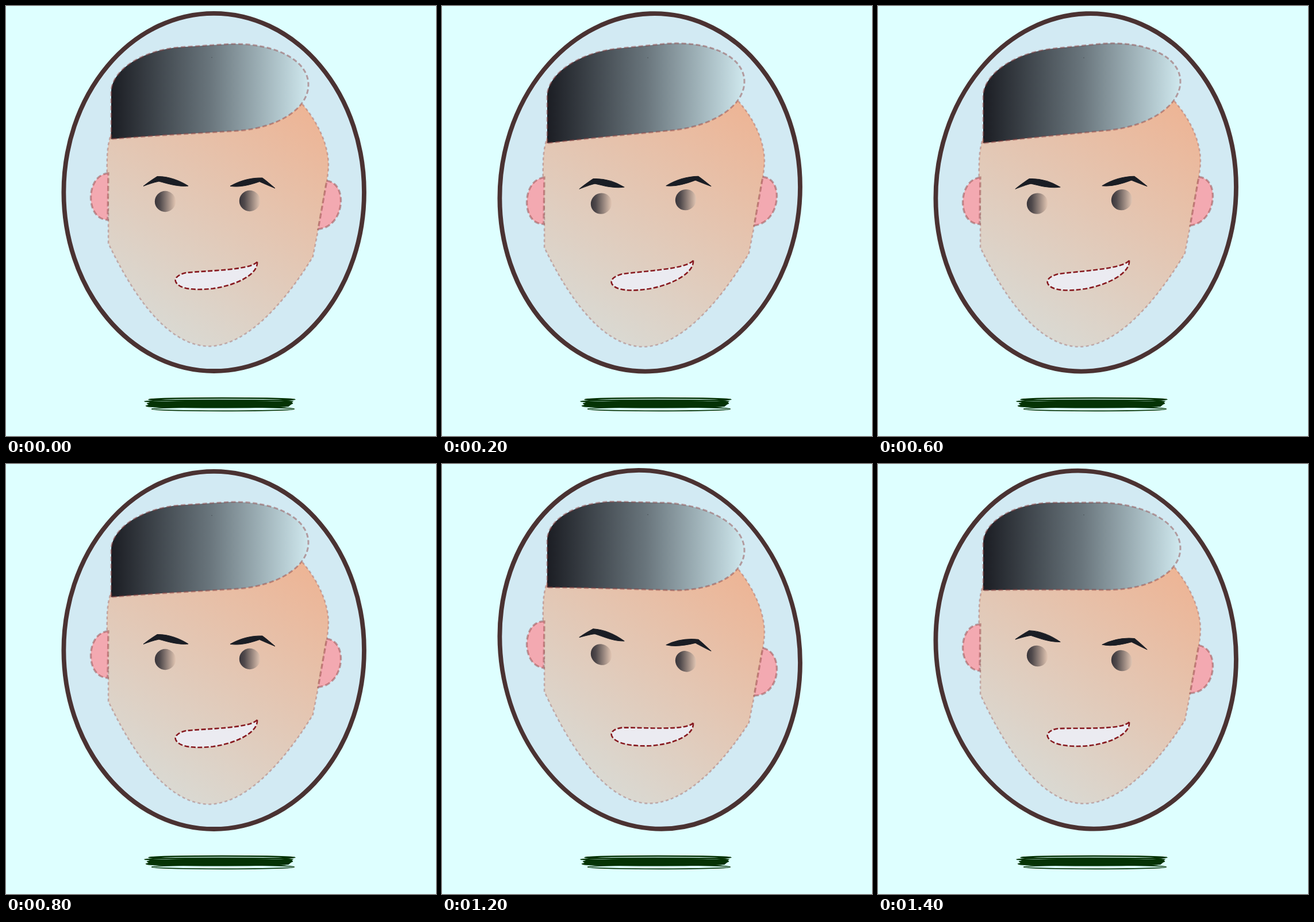
An HTML page that plays this animation: 748x748 px, repeating every 1.6 s.

```html
<!DOCTYPE html>
<html lang="en">
<head>
<meta charset="utf-8">
<title>Swaying head</title>
<style>
  html, body { margin: 0; width: 100%; height: 100%; overflow: hidden; background: #deffff; }
  svg { display: block; width: 100%; height: 100%; }
  .dash { stroke: #8c3c3c; stroke-opacity: .45; }
  .face { stroke-opacity: .33; stroke-width: 2.6; stroke-dasharray: 5 4.5; }
  .ear { fill: #f3a9b1; stroke-width: 3.4; stroke-dasharray: 9 4.5; }
  .brow { fill: #1a1d24; stroke: #1a1d24; stroke-linejoin: round; }
</style>
</head>
<body>
<svg viewBox="0 0 748 748">
  <defs>
    <linearGradient id="hair">
      <stop offset="0" stop-color="#1b1d23"/>
      <stop offset=".5" stop-color="#69757c"/>
      <stop offset="1" stop-color="#cfe8ee"/>
    </linearGradient>
    <linearGradient id="skin" gradientUnits="userSpaceOnUse" x1="520" y1="180" x2="260" y2="570">
      <stop offset="0" stop-color="#edb596"/>
      <stop offset="1" stop-color="#d9dad4"/>
    </linearGradient>
    <linearGradient id="eye">
      <stop offset="0" stop-color="#39353a"/>
      <stop offset=".25" stop-color="#514a4c"/>
      <stop offset="1" stop-color="#e2c6b3"/>
    </linearGradient>
  </defs>

  <g id="head">
    <ellipse cx="361.7" cy="323.9" rx="261.3" ry="311.1" fill="#d2eaf3" stroke="#4a3232" stroke-width="7.8"/>
    <path class="dash face" fill="url(#skin)"
      d="M178 413 L178 350 C176 315 175 285 176 262 C178 180 250 110 370 110 C440 110 490 135 515 170
         C545 205 562 245 561 280 C560 305 545 380 534 436 C495 500 425 592 352 592 C275 590 215 490 178 413Z"/>
    <path class="dash ear" d="M178 291 C138 293 137 372 177 372Z"/>
    <path class="dash ear" d="M558 304 C596 308 589 385 543 388Z"/>
    <path class="dash" fill="url(#hair)" stroke-width="3" stroke-dasharray="8 4.5"
      d="M183 231.5 V150 C183 112 237 76 305 71.5 L390 66 C470 64 526 95 526 137
         C526 178 475 211 405 217 C340 221 260 225 183 231.5Z"/>
    <circle cx="358" cy="89.5" r=".8" fill="#4a5257"/>
    <path class="brow" d="M239 313.3 C248 306 256 301 263 296.5 C283 296 303 304 317 313 C300 315 281 309 266 305 C256 307 248 310 239 313.3Z"/>
    <path class="brow" d="M390 313.3 C408 303 427 298.5 446 299 C453 304 461 311 468 317 C458 313 449 309 441 305.5 C425 311 407 316 390 313.3Z"/>
    <circle cx="277" cy="340" r="18.2" fill="url(#eye)"/>
    <circle cx="424" cy="339" r="18.2" fill="url(#eye)"/>
    <path fill="#ebebf1" stroke="#871a20" stroke-width="2.6" stroke-dasharray="8 3.5"
      d="M437 445 C425 460 350 460 313 464 C300 467 293 473 295 479 C300 493 330 495 360 491.5 C400 486 439 467 437 445Z"/>
  </g>

  <g fill="none" stroke="#053305">
    <path fill="#053305" stroke="none" d="M250 688.5 Q375 690 497 688.5 L499 691 L491 697 Q375 701 246 697 L248 692Z"/>
    <ellipse cx="375.5" cy="684.4" rx="127" ry="2.4" stroke-width="2.6"/>
    <ellipse cx="370" cy="687.8" rx="129" ry="2.2" stroke-width="2.2"/>
    <ellipse cx="372" cy="691.5" rx="126" ry="3" stroke-width="2.6"/>
    <ellipse cx="368" cy="695.5" rx="124" ry="2.6" stroke-width="2.6"/>
    <ellipse cx="377.5" cy="701" rx="124" ry="3.3" stroke-width="1.7"/>
  </g>
</svg>
<script>
  const LOOP = 1600, STEP = 200, PIVOT = 374;
  const head = document.getElementById('head');

  // The head shears about the stage centre: 3 degrees one way, 5 the other.
  function draw(ms) {
    const t = Math.floor((ms % LOOP) / STEP) * STEP;
    const wave = Math.sin(t / LOOP * 2 * Math.PI);
    const angle = wave > 0 ? -3 * wave : -5 * wave;
    head.setAttribute('transform',
      `translate(${PIVOT} 0) skewY(${angle.toFixed(4)}) translate(${-PIVOT} 0)`);
  }

  const start = performance.now();
  function tick() {
    draw(performance.now() - start);
    requestAnimationFrame(tick);
  }
  tick();
</script>
</body>
</html>
```
